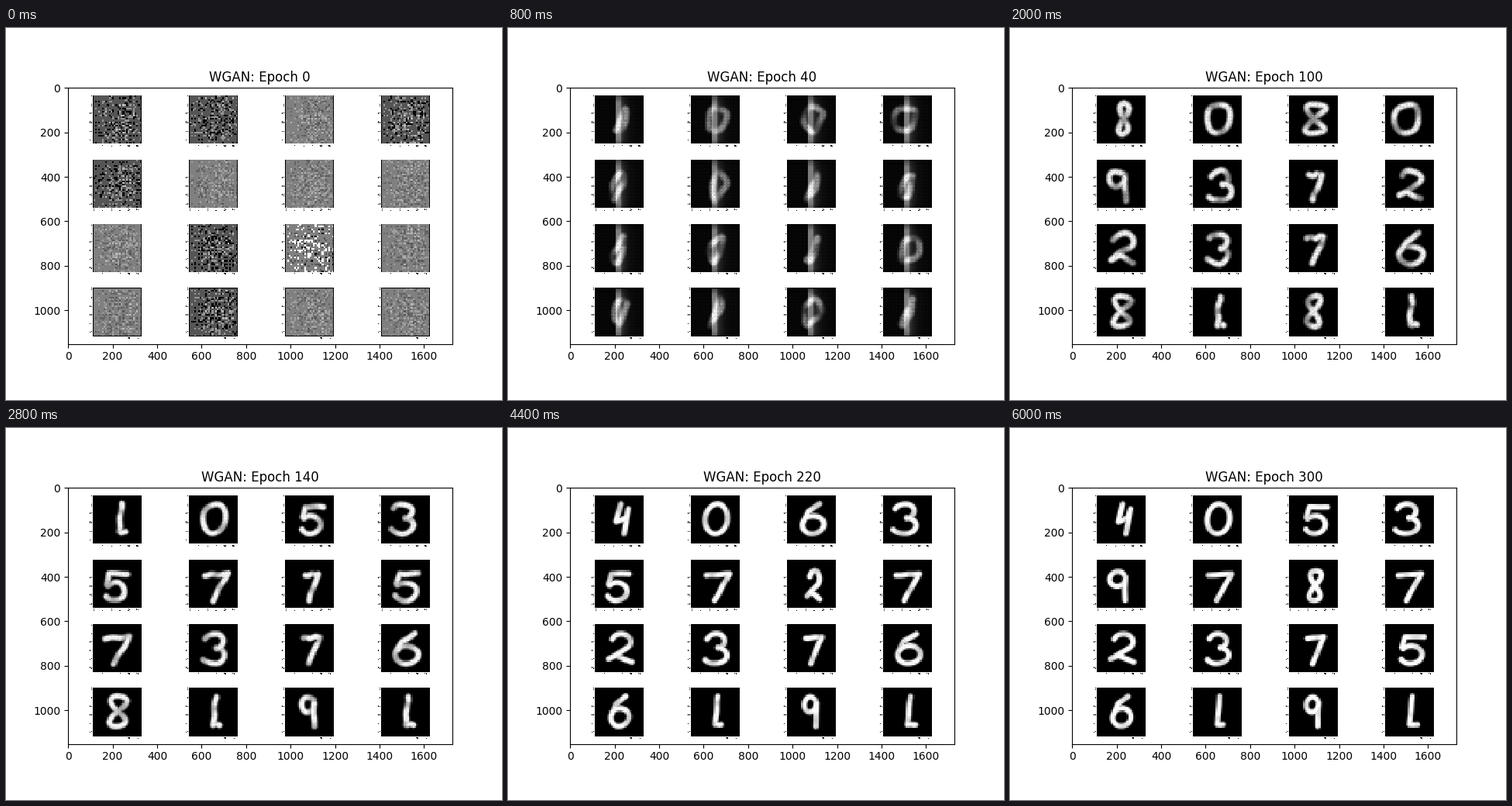
A matplotlib script for the animation above (6200 ms loop, 640 by 480 pixels).

```python
import numpy as np
import matplotlib.pyplot as plt
from matplotlib.animation import FuncAnimation

N = 28                          # cells per digit side
CELL_W, CELL_H, SIDE = 432, 288, 217
LEFT, TOP = 113, 35             # digit offset inside a sheet cell
X, Y = np.meshgrid(np.arange(N), np.arange(N))
rng = np.random.default_rng(11)


def line(*pts):
    return np.array(pts, float)


def arc(cx, cy, rx, ry, start, stop):
    a = np.radians(np.linspace(start, stop, 40))
    return np.column_stack([cx + rx * np.cos(a), cy + ry * np.sin(a)])


def path(*parts, n=90):
    """Join the parts into one pen path of n evenly spaced points."""
    p = np.vstack(parts)
    run = np.r_[0, np.cumsum(np.hypot(*np.diff(p, axis=0).T))]
    at = np.linspace(0, run[-1], n)
    return np.column_stack([np.interp(at, run, p[:, i]) for i in (0, 1)])


turn = np.linspace(0, 2 * np.pi, 80)

# pen paths in a box from -1 to 1, y pointing down
DIGITS = {
    '0': path(arc(0, 0, 1, 1, -60, 300)),
    '1': path(line((.1, -1), (0, .9), (.9, .9))),
    '2': path(arc(.1, -.45, .75, .55, 200, 400), line((-.8, .7), (-.2, .45), (1, .9))),
    '3': path(arc(-.1, -.5, .8, .5, 200, 430), arc(-.05, .45, 1, .55, 280, 510)),
    '4': path(line((-.3, -1), (-.8, .2), (.6, -.1), (.9, -.7), (.4, 1))),
    '5': path(line((1, -.8), (-.6, -.8), (-.8, -.1)), arc(0, .4, .9, .6, 220, 510)),
    '6': path(line((.5, -1), (-.5, -.5)), arc(0, .4, .95, .6, 190, -150)),
    '7': path(line((-1, -.7), (.9, -.8), (.4, 0), (-.2, 1))),
    '8': path(np.column_stack([-.8 * np.sin(2 * turn), -np.cos(turn)])),
    '9': path(arc(-.2, -.45, .7, .5, -40, -360), line((.5, -.6), (.5, .2), (.6, 1))),
}

# digits taken on while learning, centre, half width, half width of the first blob
TILES = [
    ('8144', 15.5, 4, 1.5), ('0000', 14.5, 6.5, 5), ('8565', 15, 6.5, 5), ('0333', 12.5, 7, 6),
    ('9559', 12.8, 6.5, 2.5), ('3777', 15.5, 7, 4), ('7728', 15, 4, .8), ('2577', 14, 7, 2.5),
    ('2722', 14, 7.5, 2), ('3333', 14.5, 6.5, 3), ('7777', 15, 5, .8), ('6665', 15, 7, 5),
    ('8866', 14.5, 5.5, 3), ('1111', 14.5, 3.5, 1), ('8999', 14, 5, 4.5), ('1111', 14.5, 5, .9),
]
ROW_MID = 13.5, 15, 14.5, 13.5
STAGES = 60, 100, 140, 220, 300
DARK, MID, WHITE = (0, 0, 85, 150, 190), (85, 100, 128, 160, 185), (0, 85, 128, 255, 255)
DARK_TILES, WHITE_TILE = {0, 1, 3, 4, 9, 13}, 10


def noise_tile(i):
    levels = WHITE if i == WHITE_TILE else DARK if i in DARK_TILES else MID
    env = np.exp(-(X - 16) ** 2 / 280 - (Y - 14) ** 2 / 400)
    lattice = .6 + 1.1 * (X % 2) * (Y % 2)
    q = np.rint(rng.normal(size=(N, N)) * env * lattice)
    return np.array(levels)[(np.clip(q, -2, 2) + 2).astype(int)] / 255


def stripe_tile():
    right = np.where(X > 14, .38 * np.exp(-(X - 15) / 2.5), 0)
    img = np.where(abs(X - 13) < 2, .97, .045 + right)
    ends = np.clip(np.minimum(.55 + .12 * Y, .75 + .1 * (N - 1 - Y)), 0, 1)
    return img * ends + .03 * (X % 2) * (Y % 2)


def stage_paths(i):
    digits, cx, half, blob = TILES[i]
    cy = ROW_MID[i // 4]
    first = DIGITS['0'] * (blob, 7)
    first[:, 0] -= first[:, 1] * .6 / (1 + .5 * blob)
    out = [first + (cx, cy + .5)]
    for d in digits:
        p = DIGITS[d] * (half, 8.6)
        p[:, 0] -= .06 * p[:, 1]
        out.append(p + (cx, cy))
    return out


noise = [noise_tile(i) for i in range(16)]
stripe = stripe_tile()
paths = [stage_paths(i) for i in range(16)]
phases = rng.uniform(0, 2 * np.pi, (16, 3))
grain = rng.uniform(-.12, .08, (16, N, N))
along = np.linspace(0, 2 * np.pi, 90)


def glyph(i, e):
    """Wobbly, blurred pen path that settles as the epochs go by."""
    k = min(np.searchsorted(STAGES, e, side='right') - 1, len(STAGES) - 2)
    w = (e - STAGES[k]) / (STAGES[k + 1] - STAGES[k])
    w = w * w * (3 - 2 * w)
    p = (1 - w) * paths[i][k] + w * paths[i][k + 1]
    rough = np.exp(-(e - 60) / 90)
    a, b, c = phases[i] + .02 * e
    px = p[:, 0] + .8 * rough * np.sin(2 * along + a)
    py = p[:, 1] + .8 * rough * np.sin(3 * along + b)
    force = 1 - (.1 + .5 * rough) * np.clip(np.sin(2 * along + c), 0, 1)
    d = np.hypot(X[..., None] + .5 - px, Y[..., None] + .5 - py)
    img = (force * np.clip((2.05 + .6 * rough - d) / (1 + .8 * rough), 0, 1)).max(axis=2)
    texture = 1 - rough * (.15 * (1 - (X % 2) * (Y % 2)) - grain[i])
    return np.clip(img * texture, 0, 1)


def tile_at(i, e):
    if e < 20:
        return noise[i] + (stripe - noise[i]) * e / 20
    if e < 60:
        return stripe + (glyph(i, 60) - stripe) * (e - 20) / 40
    return glyph(i, e)


def label(cell, text, x, y):
    """Tiny axis number, its top left corner at x, y."""
    for i, ch in enumerate(text):
        px, py = (DIGITS[ch] * (2, 3.5) + (x + 6 * i + 2, y + 3.5)).T
        cell[np.rint(py).astype(int), np.rint(px).astype(int)] = 0


def blank_sheet():
    cell = np.full((CELL_H, CELL_W), 255, np.uint8)
    for k in range(6):
        text, at = str(5 * k), 3.9 + 38.83 * k
        wide = 6 * len(text)
        label(cell, text, LEFT + at - wide / 2, 256)
        label(cell, text, 109 - wide, TOP + at - 4)
    return np.tile(cell, (4, 4))


sheet = blank_sheet()
zoom = np.arange(SIDE) * N // SIDE


def compose(e):
    out = sheet.copy()
    for i in range(16):
        x, y = LEFT + CELL_W * (i % 4), TOP + CELL_H * (i // 4)
        img = (tile_at(i, e) * 255).astype(np.uint8)[np.ix_(zoom, zoom)]
        img[[0, -1]] = 0
        img[:, [0, -1]] = 0
        out[y:y + SIDE, x:x + SIDE] = img
    return out


fig, ax = plt.subplots(figsize=(6.4, 4.8), dpi=100)
view = ax.imshow(sheet, cmap='gray', vmin=0, vmax=255, interpolation='nearest')
title = ax.set_title('WGAN: Epoch 0', x=.4993)


def update(i):
    view.set_data(compose(10 * i))
    title.set_text(f'WGAN: Epoch {10 * i}')
    return view, title


anim = FuncAnimation(fig, update, frames=31, interval=200, repeat=True, repeat_delay=0)
plt.show()
```
